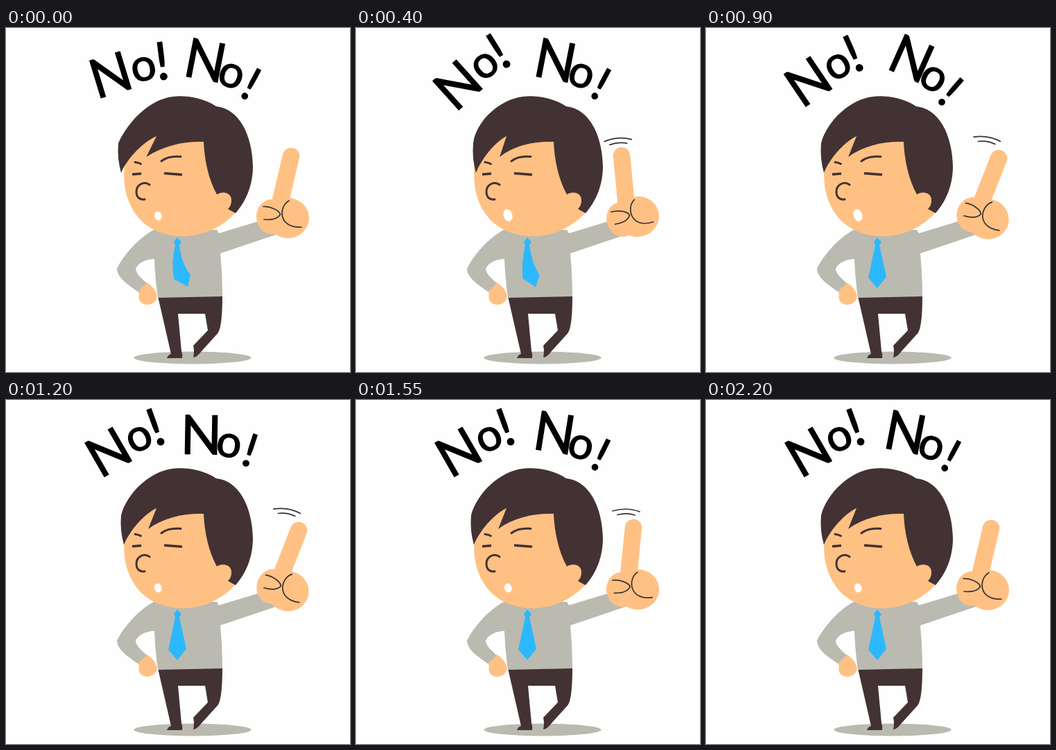
Animation of 496x496 px, one loop 2450 ms. Source, as an HTML page:

```html
<!DOCTYPE html>
<html lang="en">
<head>
<meta charset="utf-8">
<title>No! No!</title>
<style>
  html, body { margin: 0; width: 100%; height: 100%; overflow: hidden; background: #fefefe; }
  svg { display: block; width: 100vw; height: 100vh; }
  text { font-family: Lato, "Open Sans", sans-serif; text-anchor: middle; fill: #000; stroke: #000; stroke-width: 1.4; }
  .skin { fill: #ffc183; }
  .dark { fill: #433234; }
  .grey { fill: #bbbab0; }
  .ink { fill: none; stroke: #433234; stroke-width: 3; stroke-linecap: round; }
  .eye { fill: none; stroke: #433234; stroke-width: 3.5; }
  .thin { fill: none; stroke: #3c3231; stroke-width: 1.7; stroke-linecap: round; }
  #tie { fill: #2cb8ff; }
  #finger { stroke: #ffc183; stroke-width: 24.5; stroke-linecap: round; }
</style>
</head>
<body>
<svg viewBox="0 0 496 496">
  <g id="word1"></g>
  <g id="word2"></g>

  <ellipse class="grey" cx="269" cy="475.500" rx="84.5" ry="9"/>
  <path class="dark" d="M219 387L312 385C312 408 311 432 305.500 440L281 467Q276 474 270 475Q272 466 270 458L291 436L287 412H248L253 466Q255 471 254 476H232Q234 471 238 470Z"/>
  <path class="skin" d="M203 367C209 371 214 375 217 383C220 392 212 399 203 399C193 398 190 391 192 383L188 377Z"/>
  <path class="grey" d="M213 291H304L307 296L386 272L392 297L309 325Q312 355 312 387L219 389Q215 362 214 333C203 333 191 338 187 347C187 353 193 359 203 368L190 380C177 371 160 360 160 347C168 330 190 303 213 291Z"/>
  <path id="tie"/>

  <path class="skin" d="M178 165C165 205 166 250 197 280C230 309 292 309 331 266L318 150H200Z"/>
  <path id="hair" class="dark"/>
  <path class="ink" d="M186 193.500Q191 194 194.500 196M224 192Q234 184 252 185.500"/>
  <path class="eye" d="M182 211L195 210M228 209.500L254 211.500"/>
  <path class="ink" d="M207 226C199 220 188 226 188 236C188 245 194 248 200 247"/>
  <ellipse id="mouth" cx="219" fill="#fff" transform="rotate(-17 219 270)"/>

  <line id="finger"/>
  <g id="hand">
    <ellipse class="skin" cx="383" cy="272" rx="22" ry="25"/>
    <ellipse class="skin" cx="406.500" cy="274" rx="30.500" ry="29"/>
    <path class="thin" d="M371 257.500C380 257 394 262 395.500 269C391 276 381 277 372 276"/>
    <path class="thin" d="M408 249C393 257 392 289 426 287"/>
  </g>
  <path id="swish" class="thin" d="M370 160Q390 154 409 161M377 165.500Q390 162 402 166"/>
</svg>

<script>
const $ = id => document.getElementById(id);
const LOOP = 2450, STEP = 50, LAST = 44;

// letter, centre of its baseline, tilt, size
const words = {
  word1: [["N", 161.5, 99, -30, 78], ["o", 199.5, 71, -25, 64], ["!", 224.5, 64, -20, 75]],
  word2: [["N", 282.5, 74, 11, 78], ["o", 319.5, 84.5, 17, 64], ["!", 342.5, 101.5, 28, 66]]
};
for (const [id, letters] of Object.entries(words)) {
  $(id).innerHTML = letters.map(([ch, x, y, tilt, size]) =>
    `<text transform="translate(${x} ${y}) rotate(${tilt})" font-size="${size}">${ch}</text>`).join("");
}

// [time, value] keys, eased between
const tracks = {
  word1: [[0, 13], [400, -12], [650, 4], [900, -4], [1200, 0], [1350, -1], [1550, 0]],
  word2: [[0, 0], [600, 0], [900, 13], [1200, -10], [1400, 4], [1550, -2], [1800, 0]],
  tie: [[0, 1], [400, .8], [900, 0]],
  hair: [[0, -4], [400, 3], [900, 0]],
  mouth: [[0, 0], [150, 1], [450, 1], [550, 0], [650, 1], [1000, 1], [1150, 0]]
};

function at(keys, t) {
  const i = keys.findIndex(k => k[0] > t);
  if (i < 0) return keys[keys.length - 1][1];
  const [t0, a] = keys[i - 1], [t1, b] = keys[i];
  return a + (b - a) * (1 - Math.cos(Math.PI * (t - t0) / (t1 - t0))) / 2;
}

// finger base x, tip x, tip y, turn of the hand
const rest = [394, 411, 185, 0];
const right = [395, 422, 188, 11];
const mid = [392.5, 400, 184, -5];
const left = [390, 383, 184, -15];
const wag = [right, mid, left, left, mid, right];
const swishTurn = [8, 0, -6, 7.5, 13.5, 21];

const turn = (id, angle, x, y) => $(id).setAttribute("transform", `rotate(${angle} ${x} ${y})`);

function set(id, attrs) {
  for (const name in attrs) $(id).setAttribute(name, attrs[name]);
}

function hairPath(k) {
  return `M${170 + k} 209C${176 + k} 193 ${196 + k * .5} 166 217 156L${205 + k * .7} 186` +
    "C228 169 257 163 285 164C286 190 292 218 304 240C313 234 326 238 325 249Q325 256 320 261L331 267" +
    "C346 250 356 227 356 199C355 154 336 116 303 113C282 99 256 97 240 99" +
    `C208 103 ${175 - k * .5} 133 ${166 + k} 166Q${164 + k} 188 ${170 + k} 209Z`;
}

// b bends the tail sideways
function tiePath(b) {
  return "M247 302L253 309L250 313" +
    `Q${255 - 2 * b} ${336 + 4 * b} ${260 + 6 * b} ${359 - 3 * b}` +
    `L${247 + 15 * b} ${375 - 2 * b}L${234 + 8 * b} ${360 + 2 * b}` +
    `Q${239 - b} 337 244 313L242 309Z`;
}

function draw(ms) {
  const step = Math.min(LAST, Math.floor(ms % LOOP / STEP));
  const t = step * STEP;
  turn("word1", at(tracks.word1, t), 182, 84);
  turn("word2", at(tracks.word2, t), 304.5, 84);
  set("tie", { d: tiePath(at(tracks.tie, t)) });
  set("hair", { d: hairPath(at(tracks.hair, t)) });
  const open = at(tracks.mouth, t);
  set("mouth", { cy: 271 - open, rx: 5.3 + open, ry: 6.5 + open * 2.5 });

  const still = step === 0 || step === LAST;
  const phase = step % wag.length;
  const [base, x, y, angle] = still ? rest : wag[phase];
  set("finger", { x1: base, y1: 257, x2: x, y2: y });
  turn("hand", angle, 399, 273);
  turn("swish", swishTurn[phase], 399, 273);
  $("swish").style.display = still ? "none" : "";
}

const start = performance.now();
function tick() {
  draw(performance.now() - start);
  requestAnimationFrame(tick);
}
tick();
</script>
</body>
</html>
```
